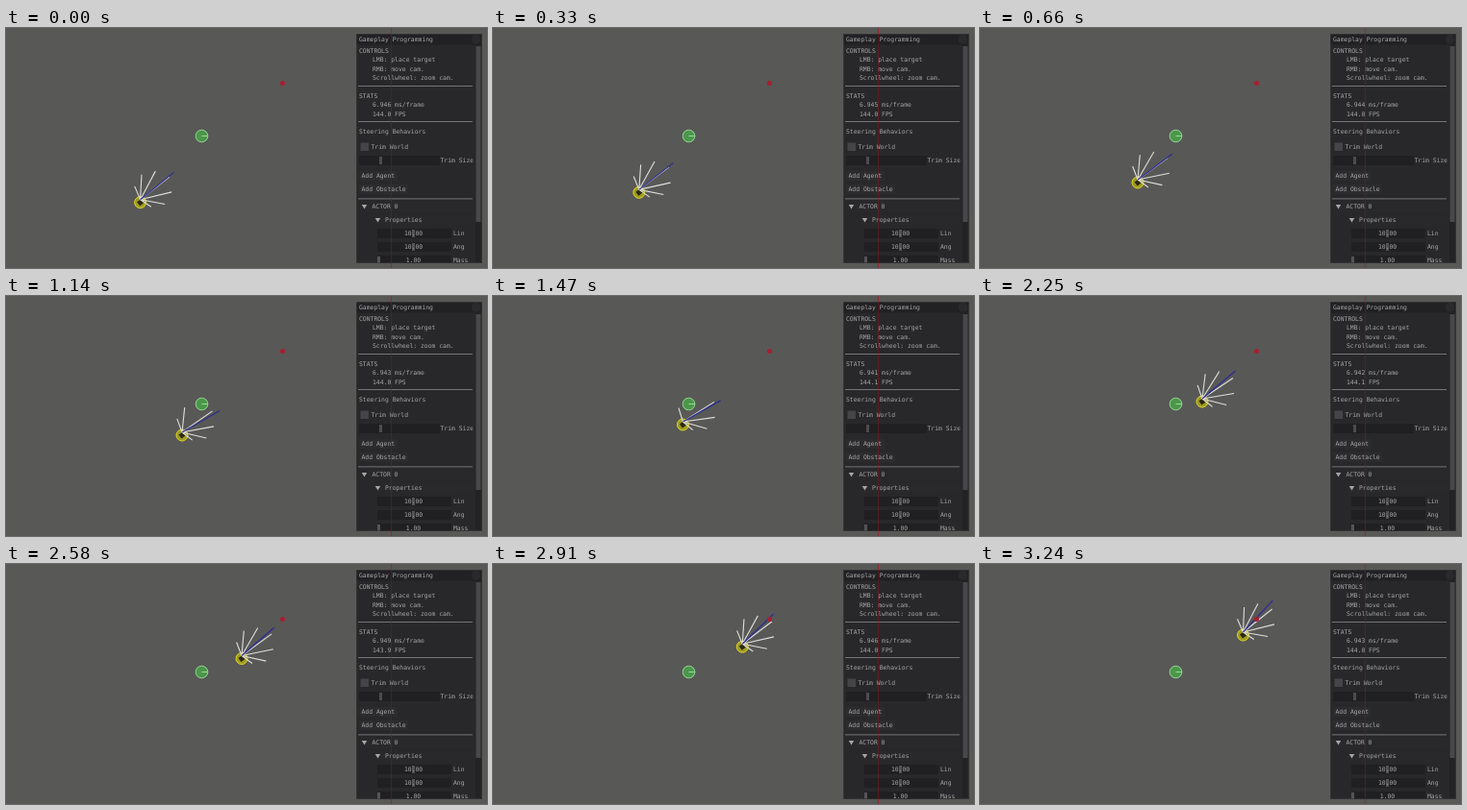
Write an HTML page with a canvas that moves like this. It is 500 by 250 pixels and loops after 3.27 s.

```html
<!DOCTYPE html>
<html>
<head>
<meta charset="utf-8">
<style>
html, body { margin: 0; width: 500px; height: 250px; overflow: hidden; background: #585856; }
canvas { display: block; }
</style>
</head>
<body>
<canvas id="stage" width="500" height="250"></canvas>
<script>
const ctx = document.getElementById('stage').getContext('2d');
const LOOP = 3270, STEP = 30, RAD = Math.PI / 180;
const INK = '#a6a6a6';
const obstacle = { x: 203.5, y: 112.5, r: 6.3 };

// time, agent x, agent y, feeler angle, velocity angle, ms per frame
const keys = [
  [0, 139.6, 181.7, -38, -39, 6.946],
  [660, 164, 161, -36, -37, 6.944],
  [1140, 183, 145, -35, -30, 6.943],
  [1770, 210.5, 124, -30, -29, 6.940],
  [2250, 231, 110, -34, -40, 6.942],
  [2580, 245, 98.5, -36, -41, 6.949],
  [3240, 273.5, 74, -38.5, -47, 6.943]
];
// angle from heading, length
const feelers = [[-75, 15], [-49, 26], [-24, 33.5], [0, 38.5], [24.5, 33.5], [48.5, 26], [72, 13.5]];

function poseAt(t) {
  let i = 0;
  while (i < keys.length - 2 && t >= keys[i + 1][0]) i++;
  const a = keys[i], b = keys[i + 1];
  const k = Math.min(1, (t - a[0]) / (b[0] - a[0]));
  return a.map((v, j) => v + (b[j] - v) * k);
}

function box(x, y, w, h, color) {
  ctx.fillStyle = color;
  ctx.fillRect(x, y, w, h);
}

function text(s, x, y, align = 'left') {
  ctx.fillStyle = INK;
  ctx.textAlign = align;
  ctx.fillText(s, x, y);
}

function line(x1, y1, x2, y2, color, width = 1) {
  ctx.strokeStyle = color;
  ctx.lineWidth = width;
  ctx.beginPath();
  ctx.moveTo(x1, y1);
  ctx.lineTo(x2, y2);
  ctx.stroke();
}

function disc(x, y, r, fill, stroke) {
  ctx.beginPath();
  ctx.arc(x, y, r, 0, 7);
  ctx.fillStyle = fill;
  ctx.fill();
  if (!stroke) return;
  ctx.strokeStyle = stroke;
  ctx.lineWidth = 1;
  ctx.stroke();
}

function arrow(x, y) {
  ctx.fillStyle = INK;
  ctx.beginPath();
  ctx.moveTo(x - 2.7, y - 2);
  ctx.lineTo(x + 2.7, y - 2);
  ctx.lineTo(x, y + 2.5);
  ctx.fill();
}

function hitsObstacle(x, y, dx, dy) {
  const k = ((obstacle.x - x) * dx + (obstacle.y - y) * dy) / (dx * dx + dy * dy);
  const c = Math.max(0, Math.min(1, k));
  return Math.hypot(x + dx * c - obstacle.x, y + dy * c - obstacle.y) < obstacle.r;
}

function drawAgent([, x, y, heading, velocity]) {
  disc(x, y, 6, '#a09b22', '#dcd722');
  ctx.save();
  ctx.translate(x, y);
  ctx.rotate(heading * RAD);
  box(-2.5, -2.5, 5, 5, '#2a2912');
  ctx.restore();

  const oy = y - 3;
  for (const [turn, length] of feelers) {
    const a = (heading + turn) * RAD;
    const dx = length * Math.cos(a), dy = length * Math.sin(a);
    if (!hitsObstacle(x, oy, dx, dy)) line(x, oy, x + dx, oy + dy, '#dededb', 1.1);
  }
  const v = velocity * RAD;
  line(x, oy, x + 45 * Math.cos(v), oy + 45 * Math.sin(v), '#2c2c94', 1.2);
}

function drawPanel(ms) {
  box(364, 6, 131, 239, 'rgba(38,38,40,.94)');
  box(364, 6, 131, 11.5, '#212124');
  disc(488.5, 11.8, 4.8, '#2a2a2d');
  box(488, 17.5, 6.5, 227, '#232325');
  box(488.5, 19, 5, 183, '#48484a');
  ctx.strokeStyle = '#3c3c40';
  ctx.lineWidth = 0.6;
  ctx.strokeRect(364.3, 6.3, 130.4, 238.4);

  ctx.save();
  ctx.beginPath();
  ctx.rect(364, 6, 121.5, 238.5);
  ctx.clip();

  for (const y of [60.5, 97.5, 177.9]) line(366, y, 485, y, '#757578');
  box(368.5, 119.5, 8.5, 8.5, '#454547');
  box(367, 133, 84, 10, '#202022');
  box(388, 134, 3, 8, '#4c4c4f');
  box(367, 149, 40, 10, '#2c2c2f');
  box(367, 163, 51, 10, '#2c2c2f');
  box(367, 181, 119, 11, '#29292c');
  box(381, 195, 105, 10.5, '#29292c');
  for (const y of [209, 223, 237]) {
    box(386, y, 77, 10, '#202022');
    box(y < 230 ? 422 : 386, y + 1, 3, 8, '#545457');
  }
  arrow(372.5, 186);
  arrow(386.5, 200);

  text('Gameplay Programming', 367, 12.3);
  text('CONTROLS', 367, 24);
  text('LMB: place target', 381, 33.5);
  text('RMB: move cam.', 381, 43);
  text('Scrollwheel: zoom cam.', 381, 52.5);
  text('STATS', 367, 71);
  text(ms.toFixed(3) + ' ms/frame', 381, 80.5);
  text((1000 / ms).toFixed(1) + ' FPS', 381, 90);
  text('Steering Behaviors', 367, 108);
  text('Trim World', 379.5, 124);
  text('Trim Size', 451.5, 138);
  text('Add Agent', 369.5, 154);
  text('Add Obstacle', 369.5, 168);
  text('ACTOR 0', 380.5, 186.5);
  text('Properties', 394, 200);
  text('10.00', 423.5, 214, 'center');
  text('10.00', 423.5, 228, 'center');
  text('1.00', 423.5, 242, 'center');
  text('Lin', 465, 214);
  text('Ang', 465, 228);
  text('Mass', 465, 242);
  ctx.restore();

  line(400.5, 6, 400.5, 245, 'rgba(130,24,34,.55)');
}

function draw(now) {
  const t = Math.floor(now % LOOP / STEP) * STEP;
  const pose = poseAt(t);
  ctx.font = '6.4px "DejaVu Sans Mono", monospace';
  ctx.textBaseline = 'middle';
  box(0, 0, 500, 250, '#585856');
  line(400.5, 0, 400.5, 250, '#8e2c34');

  disc(obstacle.x, obstacle.y, obstacle.r, '#4b974a', '#96d694');
  line(obstacle.x, obstacle.y, obstacle.x + obstacle.r, obstacle.y, '#9cd99a');
  drawAgent(pose);
  disc(287.5, 57.5, 2.5, '#a81e30');
  drawPanel(pose[5]);
}

const start = performance.now();
function tick() {
  draw(performance.now() - start);
  requestAnimationFrame(tick);
}
tick();
</script>
</body>
</html>
```
